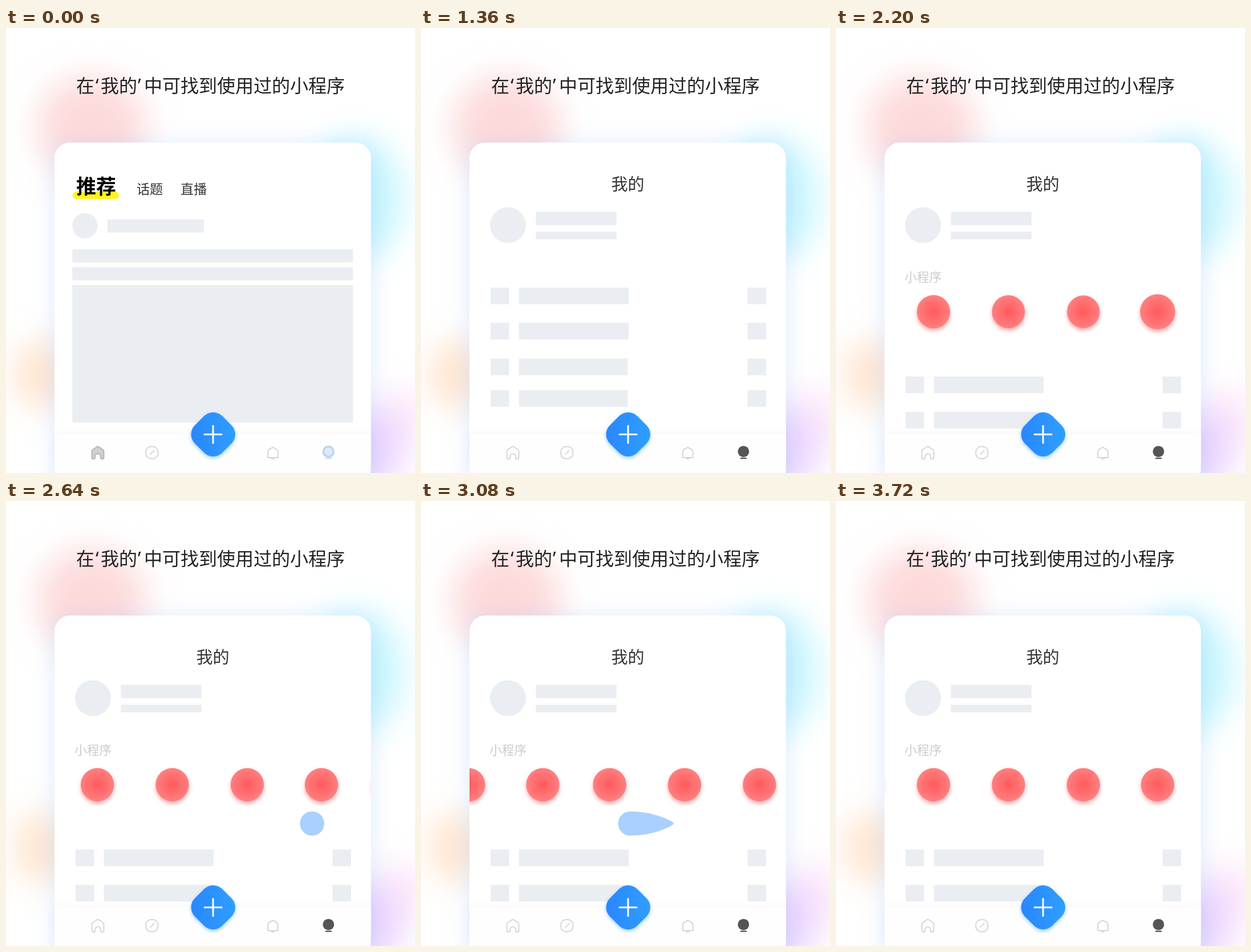
Write an HTML page that moves like this. It is 717x781 px and loops after 4240 ms.

```html
<!DOCTYPE html>
<html lang="zh-CN">
<head>
<meta charset="utf-8">
<title>小程序</title>
<style>
  html, body { margin: 0; width: 100%; height: 100%; overflow: hidden; background: #fff; }
  svg { display: block; width: 100%; height: 100%; }
  text { font-family: "Noto Sans CJK SC", "Noto Sans CJK", "Noto Sans", sans-serif; fill: #333; }
  .quote { font-family: "Noto Sans", sans-serif; }
  .block { fill: #eaedf2; }
  .line { fill: none; stroke: #d4d6db; stroke-width: 2; stroke-linecap: round; stroke-linejoin: round; }
  .touch { fill: #2a89ff; }
</style>
</head>
<body>
<svg viewBox="0 0 717 781" xmlns="http://www.w3.org/2000/svg">
  <defs>
    <filter id="blur" x="-100%" y="-100%" width="300%" height="300%"><feGaussianBlur stdDeviation="28"/></filter>
    <filter id="halo" x="-20%" y="-20%" width="140%" height="140%"><feGaussianBlur stdDeviation="20"/></filter>
    <filter id="barShadow" x="-5%" y="-40%" width="110%" height="180%">
      <feDropShadow dx="0" dy="-2" stdDeviation="6" flood-color="#000" flood-opacity=".035"/>
    </filter>
    <filter id="blueShadow" x="-30%" y="-30%" width="160%" height="160%">
      <feDropShadow dx="0" dy="3" stdDeviation="3" flood-color="#2a89ff" flood-opacity=".4"/>
    </filter>
    <filter id="redShadow" x="-30%" y="-30%" width="160%" height="170%">
      <feDropShadow dx="0" dy="4" stdDeviation="3.5" flood-color="#ff5a5a" flood-opacity=".5"/>
    </filter>
    <radialGradient id="red">
      <stop offset="0" stop-color="#ff5a5c"/><stop offset="1" stop-color="#ff7f80"/>
    </radialGradient>
    <linearGradient id="blue" x1="0" y1="1" x2="1" y2="0">
      <stop offset="0" stop-color="#2b84ff"/><stop offset="1" stop-color="#2ea1ff"/>
    </linearGradient>
    <clipPath id="cardClip"><rect x="85" y="201" width="554.7" height="600" rx="27"/></clipPath>
    <path id="house" d="M150.5 743Q150.5 741 152 740L159 735.2Q161 734 163 735.2L170 740Q171.5 741 171.5 743V753.5Q171.5 756.5 168.8 756.5Q165.8 756.5 165.8 753.5V752A4.8 4.8 0 0 0 156.2 752V753.5Q156.2 756.5 153.2 756.5Q150.5 756.5 150.5 753.5Z"/>
  </defs>

  <g filter="url(#blur)">
    <ellipse cx="150" cy="175" rx="96" ry="92" fill="#fddada"/>
    <ellipse cx="612" cy="300" rx="86" ry="110" fill="#c8f6ff"/>
    <ellipse cx="64" cy="608" rx="52" ry="62" fill="#ffe6d2"/>
    <ellipse cx="690" cy="690" rx="46" ry="56" fill="#fde6fa"/>
    <ellipse cx="640" cy="740" rx="56" ry="72" fill="#ead4ff"/>
  </g>
  <rect x="85" y="205" width="555" height="620" rx="27" fill="#8cb8ff" opacity=".3" filter="url(#halo)"/>

  <text font-size="32" y="113" style="fill:#222"><tspan x="123">在</tspan><tspan class="quote" x="157">‘</tspan><tspan x="166">我的</tspan><tspan class="quote" x="231">’</tspan><tspan x="242">中可找到使用过的小程序</tspan></text>

  <rect x="85" y="201" width="554.7" height="600" rx="27" fill="#fff"/>

  <g clip-path="url(#cardClip)">
    <g id="feed">
      <rect x="117" y="287" width="81" height="13" rx="6.5" fill="#fff31f"/>
      <text x="123" y="291" font-size="35" font-weight="700" style="fill:#000">推荐</text>
      <text x="229" y="291" font-size="23">话题</text>
      <text x="306" y="291" font-size="23">直播</text>
      <g class="block">
        <circle cx="138.5" cy="347" r="22.3"/>
        <rect x="177.7" y="336" width="169.3" height="23"/>
        <rect x="116.3" y="388.3" width="492" height="23"/>
        <rect x="116.3" y="419.8" width="492" height="23"/>
        <rect x="116.3" y="451" width="492" height="241.5"/>
      </g>
    </g>
    <g id="mine">
      <text x="333.5" y="285" font-size="29">我的</text>
      <g class="block">
        <circle cx="152.5" cy="346" r="31.5"/>
        <rect x="201.5" y="322.5" width="141.3" height="23.5"/>
        <rect x="201.5" y="357.5" width="141.3" height="13.3"/>
      </g>
      <g id="rows" class="block"></g>
      <text id="label" x="120" y="445" font-size="21.7" style="fill:#ccc">小程序</text>
      <g id="apps"></g>
    </g>
    <path id="swipe" class="touch" opacity=".4"/>
  </g>

  <path d="M85 713H639.7V757Q639.7 779 617.7 779H107Q85 779 85 757Z" fill="#fefefe" filter="url(#barShadow)"/>
  <use href="#house" class="line"/>
  <use id="homeFill" href="#house" fill="#555" stroke="#555" stroke-width="1.5"/>
  <g class="line">
    <rect x="245.2" y="734.7" width="21.2" height="21.2" rx="9"/>
    <path d="M253.3 747.8L259.6 741.4"/>
    <path d="M459 754V745.5Q459 740 463.5 738.3Q466 737.3 467.7 735.8Q469.5 737.3 472 738.3Q476.8 740 476.8 745.5V754ZM465.5 756.3H470"/>
    <path d="M561 755.3H570"/>
    <circle cx="565.3" cy="743.3" r="8.8"/>
  </g>
  <g id="meFill">
    <circle cx="565.3" cy="743.3" r="9.9" fill="#555"/>
    <path d="M560.8 755.2H570" stroke="#555" stroke-width="2.2" stroke-linecap="round"/>
  </g>
  <circle id="tap" class="touch" cx="565.5" cy="744"/>

  <g filter="url(#blueShadow)">
    <rect x="-34" y="-34" width="68" height="68" rx="22.6" transform="translate(363.2 713.2) rotate(45)" fill="url(#blue)"/>
  </g>
  <path d="M348 713.2H378M363 698.2V728.2" stroke="#fff" stroke-width="3" stroke-linecap="round"/>
</svg>
<script>
const LOOP = 4240;
const $ = id => document.getElementById(id);
const make = (parent, tag, attrs) => {
  const node = document.createElementNS('http://www.w3.org/2000/svg', tag);
  for (const name in attrs) node.setAttribute(name, attrs[name]);
  return parent.appendChild(node);
};
const clamp = v => Math.min(1, Math.max(0, v));
const linear = p => p;
const smooth = p => p * p * (3 - 2 * p);

// Value at time t along [time, value] steps.
function track(t, steps, ease = linear) {
  if (t <= steps[0][0]) return steps[0][1];
  for (let i = 1; i < steps.length; i++) {
    const [t0, v0] = steps[i - 1], [t1, v1] = steps[i];
    if (t < t1) return v0 + (v1 - v0) * ease((t - t0) / (t1 - t0));
  }
  return steps[steps.length - 1][1];
}

// Cubic Bezier easing with control points (x1, 0) and (x2, 1).
function bezier(x1, x2, x) {
  let lo = 0, hi = 1, s = .5;
  for (let i = 0; i < 24; i++) {
    s = (lo + hi) / 2;
    const at = 3 * (1 - s) * (1 - s) * s * x1 + 3 * (1 - s) * s * s * x2 + s ** 3;
    if (at < x) lo = s; else hi = s;
  }
  return 3 * (1 - s) * s * s + s ** 3;
}
const scroll = t => t <= 2520 ? 0 : t >= 3720 ? 1 : bezier(.44, .24, (t - 2520) / 1200);

[[455.5, 192.3], [517.4, 192.3], [580.2, 190.8], [635.6, 190.8]].forEach(([y, width]) => {
  [[122, 32.4], [171.6, width], [572.5, 32.4]].forEach(([x, w]) =>
    make($('rows'), 'rect', { x, y, width: w, height: 29.2 }));
});

const PAGE = 510;
const apps = [171, 302.3, 433.7, 563.8].flatMap((x, i) => [{ x, i }, { x: x + PAGE, i }]);
for (const app of apps) {
  app.node = make($('apps'), 'g', {});
  make(app.node, 'circle', { r: 29.2, fill: 'url(#red)', filter: 'url(#redShadow)' });
}
const pop = [[0, 0], [160, 1], [240, 1.16], [380, .98], [540, 1]];

function drop(t) {
  const r = 21.3 * track(t, [[2480, 0], [2600, 1], [3400, 1], [3560, 0]], smooth);
  if (r < .1) return '';
  const head = time => 542 - 255 * scroll(time);
  const x = head(t), y = 566;
  const len = r + Math.max(0, head(t - 130) - x - 6) * r / 21.3;
  const k = .552, tip = k * r * r / len;
  return `M${x} ${y - r}C${x + k * len} ${y - r} ${x + len} ${y - tip} ${x + len} ${y}` +
    `C${x + len} ${y + tip} ${x + k * len} ${y + r} ${x} ${y + r}A${r} ${r} 0 0 1 ${x} ${y - r}Z`;
}

function render(t) {
  const fade = (id, ...steps) => $(id).setAttribute('opacity', track(t, steps));
  fade('homeFill', [0, .27], [120, 0]);
  fade('meFill', [560, 0], [660, 1]);
  fade('feed', [560, 1], [740, 0]);
  fade('mine', [740, 0], [960, 1]);
  fade('label', [1640, 0], [1880, 1]);
  fade('tap', [0, .17], [120, .4], [320, .4], [560, 0]);
  $('tap').setAttribute('r', track(t, [[0, 11], [200, 22], [560, 25]], smooth));

  const dy = track(t, [[1360, 0], [1440, -10], [1800, 155.6], [1880, 156.2]], smooth);
  $('rows').setAttribute('transform', `translate(0 ${dy})`);

  const shift = PAGE * scroll(t);
  for (const { node, x, i } of apps) {
    const size = track(t - 1640 - 80 * i, pop);
    node.setAttribute('transform', `translate(${x - shift} 498) scale(${size})`);
    node.setAttribute('visibility', size > 0 ? 'visible' : 'hidden');
  }
  $('swipe').setAttribute('d', drop(t));
}

const start = performance.now();
function tick() {
  render((performance.now() - start) % LOOP);
  requestAnimationFrame(tick);
}
tick();
</script>
</body>
</html>
```
